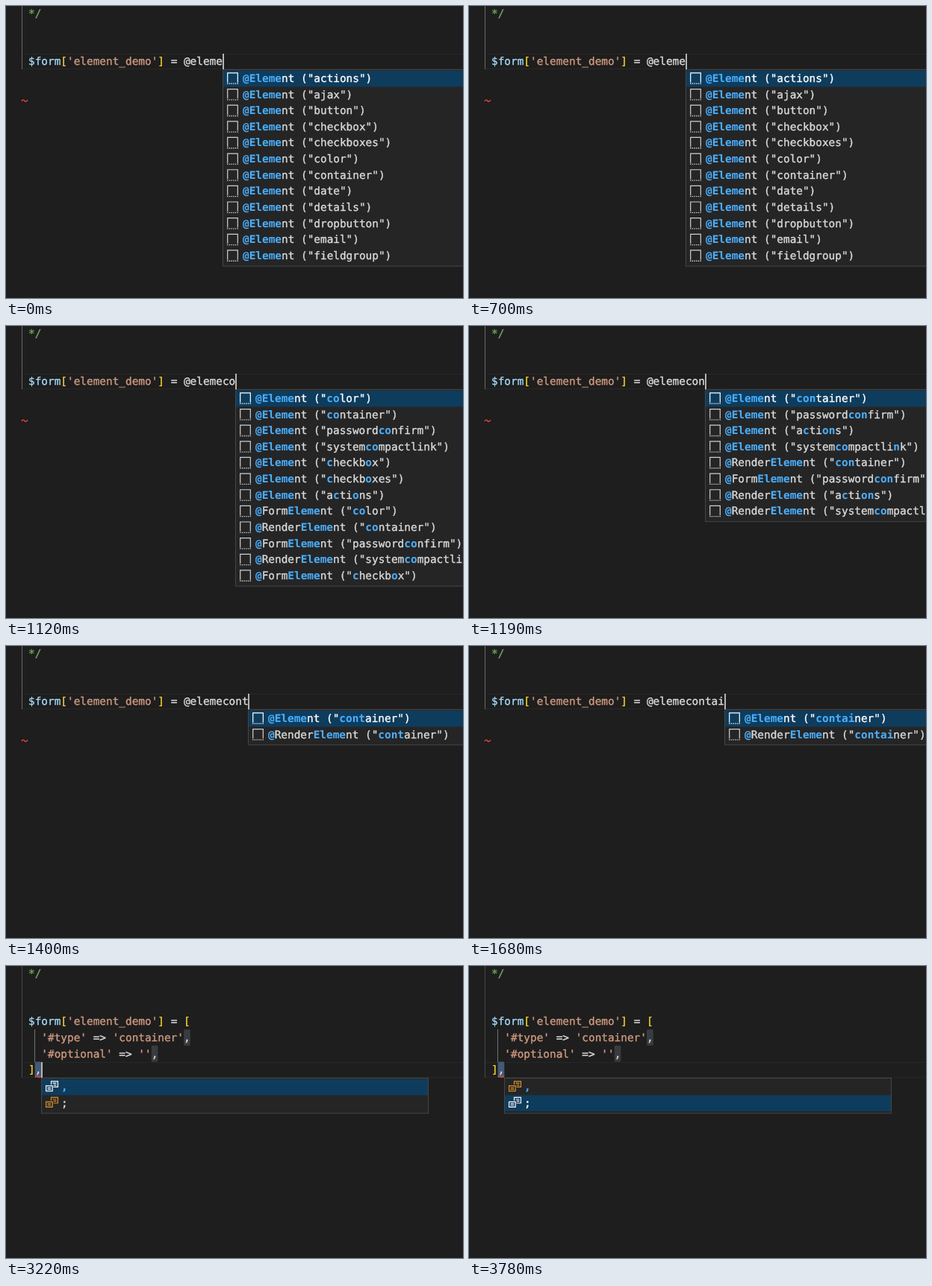
These frames come from a looping animation (612x392 px, 3850 ms). An HTML page:

```html
<!DOCTYPE html>
<html lang="en">
<head>
<meta charset="utf-8">
<title>Form element completion</title>
<style>
  html, body { margin: 0; width: 100%; height: 100%; overflow: hidden; background: #1e1e1e; }
  svg { display: block; }
  text {
    font: 14.4px "DejaVu Sans Mono", monospace;
    white-space: pre;
    text-rendering: geometricPrecision;
    color: #dadada;
  }
  text, tspan { fill: currentColor; stroke: currentColor; stroke-width: .35px; }
  .variable { color: #a4dbfb; }
  .bracket { color: #f8d530; }
  .string { color: #cf987f; }
  .comment { color: #74a45c; }
  .match { color: #4aadf8; font-weight: bold; stroke-width: .1px; }
  .picked { color: #fff; }
  .detail { font-size: 12px; color: #a4a4a4; }
</style>
</head>
<body>
<svg id="stage" width="612" height="392" viewBox="0 0 612 392"></svg>
<script>
const LOOP = 3850, LEFT = 30, CHAR = 8.67, LINE = 21.6, ROW = 21.64, BASE = 15.8;
const stage = document.getElementById('stage');

const lineTop = i => -1.2 + LINE * i;
const col = n => LEFT + CHAR * n;
const rect = (x, y, w, h, fill, extra = '') =>
  `<rect x="${x}" y="${y}" width="${w}" height="${h}" fill="${fill}" ${extra}/>`;
const path = (d, stroke, extra = '') =>
  `<path d="${d}" fill="none" stroke="${stroke}" ${extra}/>`;
const text = (x, y, body, cls = '') => `<text x="${x}" y="${y}" class="${cls}">${body}</text>`;
const span = (cls, s) => `<tspan class="${cls}">${s}</tspan>`;
const str = s => span('string', s);
const code = (line, column, body) => text(col(column), lineTop(line) + BASE, body);

// Underscores enclose the matched letters of a suggestion.
const mark = s => s.split('_').map((p, i) => i % 2 ? span('match', p) : p).join('');
const plain = name => `_@Eleme_nt ("${name}")`;
const render = name => `_@_Render_Eleme_nt ("${name}")`;
const form = name => `_@_Form_Eleme_nt ("${name}")`;
const rows = (make, names) => names.split(' ').map(make);

const lists = {
  '': rows(plain, 'actions ajax button checkbox checkboxes color container date details dropbutton email fieldgroup'),
  c: rows(plain, '_c_heckbox _c_heckboxes _c_olor _c_ontainer a_c_tions ma_c_hinename sear_c_h sele_c_t ' +
    'verti_c_altabs system_c_ompactlink password_c_onfirm tablesele_c_t'),
  co: [
    ...rows(plain, '_co_lor _co_ntainer password_co_nfirm system_co_mpactlink _c_heckb_o_x _c_heckb_o_xes a_c_ti_o_ns'),
    form('_co_lor'), render('_co_ntainer'), form('password_co_nfirm'),
    render('system_co_mpactlink'), form('_c_heckb_o_x')
  ],
  con: [
    ...rows(plain, '_con_tainer password_con_firm a_c_ti_on_s system_co_mpactli_n_k'),
    render('_con_tainer'), form('password_con_firm'),
    render('a_c_ti_on_s'), render('system_co_mpactli_n_k')
  ]
};
for (const typed of ['cont', 'conta', 'contai']) {
  const name = `_${typed}_${'container'.slice(typed.length)}`;
  lists[typed] = [plain(name), render(name)];
}

const keyTimes = [1050, 1120, 1190, 1400, 1540, 1680];

function snippetIcon(x, y, color) {
  return path(`M${x + .7} ${y + 13.5}V${y + .7}h13.6V${y + 13.5}`, color, 'stroke-width="1.2"') +
    path(`M${x} ${y + 15}h15`, color, 'stroke-width="1.3" stroke-dasharray="1.4 1.3"');
}

function enumIcon(x, y, color) {
  return path(`M${x + 7.5} ${y + 5}v-4.4h9v7.6h-6M${x + .6} ${y + 6.6}h8.6v7h-8.6z` +
    `M${x + 9.5} ${y + 3.2}h5M${x + 10.8} ${y + 5.6}h3.7` +
    `M${x + 2.6} ${y + 9}h4.6M${x + 2.6} ${y + 11.2}h4.6`, color, 'stroke-width="1.15"');
}

const rowTop = (y, i) => y + 1.8 + i * ROW;
const rowBase = (y, i) => rowTop(y, i) + 15.1;

function popup(x, y, width, items, picked, icon, iconColor) {
  let out = rect(x + .5, y + .5, width, items.length * ROW + 4, '#252526', 'stroke="#454545"');
  items.forEach((item, i) => {
    const top = rowTop(y, i), on = i === picked;
    if (on) out += rect(x + 1, top, width - 1, ROW, '#0e3c5d');
    out += icon(x + 6, top + 2.4, on ? '#fff' : iconColor);
    out += text(x + 27, rowBase(y, i), mark(item), on ? 'picked' : '');
  });
  return out;
}

const guide = (x, y1, y2, color) => rect(x, y1, 1, y2 - y1, color);
const squiggle = (x, y) =>
  path(`M${x} ${y}q1.8-3 3.8-.6t4.2-1`, '#e5453f', 'stroke-width="1.4"');
const currentLine = i =>
  path(`M22 ${Math.ceil(lineTop(i)) + .5}H612M22 ${Math.floor(lineTop(i + 1)) - .5}H612`, '#282828');
const caret = (column, line) =>
  rect(Math.floor(col(column)), Math.ceil(lineTop(line)), 2, 21, '#b4b4b2');

const header = text(LEFT, lineTop(0) + BASE, '*/', 'comment');
const target = span('variable', '$form') + span('bracket', '[') + str("'element_demo'") +
  span('bracket', ']') + ' = ';

function typing(t, caretOn) {
  const typed = 'contai'.slice(0, keyTimes.filter(k => t >= k).length);
  const column = 30 + typed.length;
  let out = currentLine(3) + guide(21, 0, 85, '#686868') + header +
    code(3, 0, target + '@eleme' + typed) + squiggle(21, 127.8) +
    popup(Math.floor(col(column)), 85, 400, lists[typed], 0, snippetIcon, '#d0d0d0');
  if (typed === 'c') {
    out += text(605, rowBase(85, 9), '@Element', 'detail') +
      text(597, rowBase(85, 10), '@Element', 'detail');
  }
  return out + (caretOn ? caret(column, 3) : '');
}

function expanded(t, caretOn) {
  const stop = (column, line, fill) =>
    rect(col(column), lineTop(line), CHAR, LINE, fill, 'rx="1.5"');
  return currentLine(6) + guide(21, 0, 150, '#484848') + guide(38, 85, 129, '#707070') +
    stop(24, 4, '#383c40') + stop(19, 5, '#383c40') + stop(1, 6, '#425a73') +
    header + code(3, 0, target + span('bracket', '[')) +
    code(4, 2, str("'#type'") + ' =&gt; ' + str("'container'") + ',') +
    code(5, 2, str("'#optional'") + ' =&gt; ' + str("''") + ',') +
    code(6, 0, span('bracket', ']') + ',') +
    (t < 3010 ? squiggle(21, 191.8) : squiggle(39, 148.8)) +
    popup(47, 150, 518, ['_,_', ';'], t < 3640 ? 0 : 1, enumIcon, '#d9932f') +
    (caretOn ? caret(2, 6) : '');
}

let shown = '';
function frame(now) {
  const t = now % LOOP;
  const caretOn = !(t >= 210 && t < 700 || t >= 2730 && t < 3220 || t >= 3780);
  const next = t < 2240 ? typing(t, caretOn) : expanded(t, caretOn);
  if (next !== shown) stage.innerHTML = shown = next;
  requestAnimationFrame(frame);
}
frame(performance.now());
</script>
</body>
</html>
```
